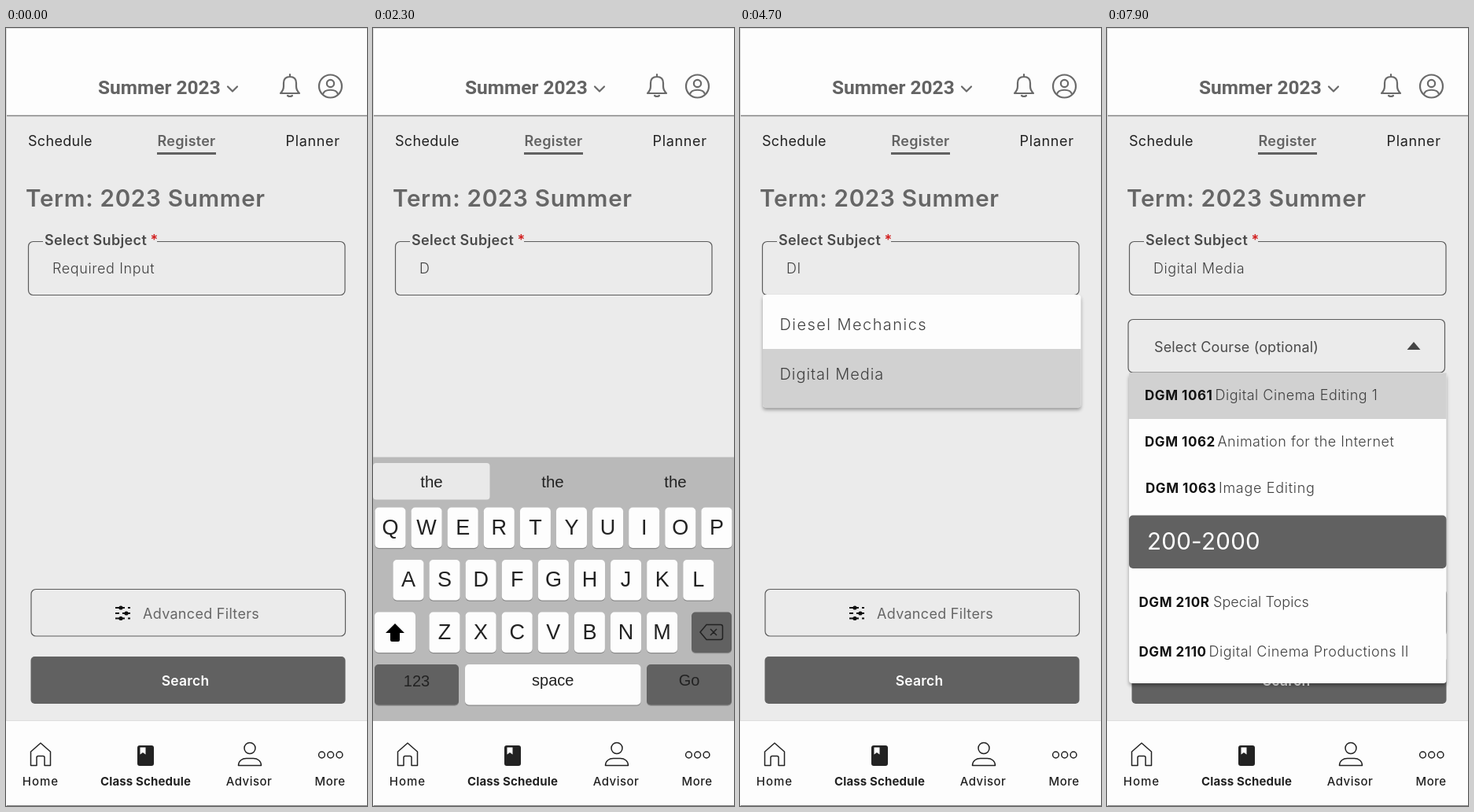
An HTML page for the animation above (8 s loop, 459 px wide and 989 px high).

```html
<!DOCTYPE html>
<html lang="en">
<head>
<meta charset="utf-8">
<title>Class registration</title>
<style>
  html, body { margin: 0; width: 100%; height: 100%; overflow: hidden; background: #fdfdfd; }
  svg { display: block; width: 459px; height: 989px; font: 18px Inter, sans-serif; }
  .line { fill: none; stroke: #5c5c5c; stroke-width: 1.2; }
  .icon { fill: none; stroke: #6a6a6a; stroke-width: 2.2; stroke-linecap: round; stroke-linejoin: round; }
  .thin { stroke: #222; stroke-width: 1.5; }
  .mid { text-anchor: middle; }
  .bold { font-weight: 600; }
  .soft { fill: #404040; font-weight: 300; }
  .nav { font-size: 15px; font-weight: 500; letter-spacing: .45px; text-anchor: middle; fill: #222; }
  .panel { filter: drop-shadow(0 3px 2px rgba(0, 0, 0, .35)); }
  .code { font-size: 17px; font-weight: 700; letter-spacing: .55px; fill: #111; }
  #keyboard { font-family: "Liberation Sans", Arial, sans-serif; font-size: 20px; text-anchor: middle; fill: #222; }
  #keyboard .letter { font-size: 27px; }
</style>
</head>
<body>
<svg viewBox="0 0 459 989">
  <rect width="459" height="989" fill="#fdfdfd"/>
  <rect y="111" width="459" height="770" fill="#ebebeb"/>
  <path d="M0 111.5H459M0 988.5H459" stroke="#858585" stroke-width="1.4"/>
  <path d="M0 .5H459M.5 0V989M0 880.5H459" stroke="#dedede"/>

  <text x="117" y="84" font-family="Roboto, sans-serif" font-size="24.5" font-weight="700" fill="#636363">Summer 2023</text>
  <g class="icon">
    <path d="M282 74.5l6 6 6-6"/>
    <path d="M349 83c3-3 4-5 4-9v-4c0-5 3-8 8-8s8 3 8 8v4c0 4 1 6 4 9zM361 59v3M358 86q3 2 6 0"/>
    <circle cx="412.5" cy="74" r="14.5"/>
    <circle cx="412.5" cy="70.500" r="4.600"/>
    <path d="M403 84c2-7 17-7 19 0"/>
  </g>

  <text x="28" y="149.500" letter-spacing=".3" fill="#222">Schedule</text>
  <text class="mid bold" x="229.500" y="149.500" letter-spacing=".25" fill="#636363">Register</text>
  <text x="355.500" y="149.500" letter-spacing=".65" fill="#222">Planner</text>
  <rect x="192" y="158" width="75" height="3" fill="#616161"/>

  <text class="bold" x="25" y="227" font-size="29.6" letter-spacing=".7" fill="#666">Term: 2023 Summer</text>

  <rect class="line" x="28.500" y="271.500" width="402.500" height="68" rx="6"/>
  <rect x="47" y="268" width="145" height="7" fill="#ebebeb"/>
  <text class="bold" x="49" y="276" letter-spacing=".35" fill="#4a4a4a">Select Subject</text>
  <text class="bold" x="183.500" y="276" fill="#d21f1f">*</text>
  <text class="soft" id="subject" x="59" y="312" letter-spacing=".6"></text>

  <g id="course">
    <rect class="line" x="27" y="370.500" width="402.500" height="67.500" rx="6"/>
    <text x="60" y="411.500" letter-spacing=".15" fill="#4a4a4a">Select Course (optional)</text>
    <path id="arrow" d="M381.500 399h17l-8.500 10z" fill="#444"/>
  </g>

  <rect class="line" x="32" y="713.500" width="399.500" height="59.500" rx="6"/>
  <path d="M139 737h12M155 737h3M139 744h5M148 744h10M139 750.500h12M155 750.500h3" stroke="#111" stroke-width="1.8"/>
  <g fill="#111"><circle cx="146" cy="737" r="2.6"/><circle cx="153" cy="744" r="2.6"/><circle cx="146" cy="750.500" r="2.6"/></g>
  <text x="174" y="750.500" letter-spacing=".3" fill="#666">Advanced Filters</text>
  <rect x="31.500" y="799" width="400" height="60" rx="5" fill="#616161"/>
  <text class="mid bold" x="228" y="836" font-size="17.5" letter-spacing=".2" fill="#fff">Search</text>

  <g id="subjects">
    <rect class="panel" x="29" y="339" width="404.500" height="143.500" rx="4" fill="#fdfdfd"/>
    <path id="subjectHover" d="M29 408h404.500v70.500q0 4-4 4H33q-4 0-4-4z" fill="#d1d1d1"/>
    <g class="soft" font-size="20">
      <text x="50.500" y="384" letter-spacing="1.45">Diesel Mechanics</text>
      <text x="50.500" y="447" letter-spacing=".95">Digital Media</text>
    </g>
  </g>

  <g id="courses">
    <rect class="panel" x="28" y="438.500" width="403.500" height="394.500" rx="4" fill="#fdfdfd"/>
    <rect id="courseHover" x="28" y="438.500" width="403.500" height="58.500" fill="#d1d1d1"/>
    <rect x="28" y="619.500" width="403.500" height="67.500" rx="5" fill="#616161"/>
    <text x="51" y="662.500" font-size="29.500" letter-spacing=".3" fill="#fff">200-2000</text>
  </g>

  <g id="keyboard"><rect y="545.500" width="459" height="335.500" fill="#b9b9b9"/></g>

  <rect y="881" width="459" height="107" fill="#fdfdfd"/>
  <g class="icon thin">
    <path d="M31.500 920l12.500-11 12.500 11v17.500H49V927.500q0-2-2-2h-6q-2 0-2 2v10h-7.500z"/>
    <circle cx="310" cy="915.500" r="7"/>
    <path d="M295.500 937.500c0-6 5-9 10-9h9c5 0 10 3 10 9z"/>
    <circle cx="401.500" cy="924" r="3.900"/><circle cx="412.700" cy="924" r="3.900"/><circle cx="424" cy="924" r="3.900"/>
  </g>
  <rect x="167" y="912" width="21" height="26" rx="3" fill="#222"/>
  <path d="M170.500 914.500h7v9l-3.500-2.500-3.500 2.500z" fill="#fff"/>
  <g class="nav">
    <text x="44" y="962.500" letter-spacing="1">Home</text>
    <text x="177.500" y="962.500" font-weight="700" style="letter-spacing: .15px">Class Schedule</text>
    <text x="309" y="962.500">Advisor</text>
    <text x="412" y="962.500">More</text>
  </g>
</svg>
<script>
const LOOP = 8000, FADE = 300;
const byId = id => document.getElementById(id);

function add(parent, tag, attrs, text = '') {
  const node = document.createElementNS('http://www.w3.org/2000/svg', tag);
  for (const name in attrs) node.setAttribute(name, attrs[name]);
  node.textContent = text;
  return parent.appendChild(node);
}

const keyboard = byId('keyboard');
function key(x, y, width, label, baseline, { dark, letter } = {}) {
  const box = { x, y, width, height: 51.5, rx: 5 };
  add(keyboard, 'rect', { ...box, y: y + 1.2, fill: '#8c8c8c' });
  add(keyboard, 'rect', { ...box, fill: dark ? '#616161' : '#fdfdfd' });
  add(keyboard, 'text', { x: x + width / 2, y: baseline, class: letter ? 'letter' : '' }, label);
}

add(keyboard, 'rect', { x: 0, y: 553, width: 148.5, height: 46.5, rx: 4, fill: '#e9e9e9' });
for (const x of [74.5, 228.5, 384.5]) add(keyboard, 'text', { x, y: 583.5, 'font-size': 20.5 }, 'the');
[['QWERTYUIOP', 2.5, 609.5], ['ASDFGHJKL', 25.5, 676], ['ZXCVBNM', 71.5, 742.5]].forEach(([row, x, y]) =>
  [...row].forEach((ch, i) => key(x + i * 46.1, y, 39, ch, y + 34, { letter: true })));
key(2, 742.5, 52, '', 0);
key(405, 742.5, 51, '', 0, { dark: true });
key(2, 809, 107, '123', 837, { dark: true });
key(117, 809, 223.5, 'space', 836);
key(348, 809, 108, 'Go', 836, { dark: true });
add(keyboard, 'path', { d: 'M28 757l12 12h-6v9q0 2-2 2h-8q-2 0-2-2v-9h-6z', fill: '#000' });
add(keyboard, 'path', {
  d: 'M416 768l8-9.500h18q2.500 0 2.500 2.500v14q0 2.500-2.500 2.500h-18zM429 764l8 8m0-8l-8 8',
  fill: 'none', stroke: '#222', 'stroke-width': 1.5
});

[
  [48, 473, 'DGM 1061', 137.5, 'Digital Cinema Editing 1', .5],
  [48, 532, 'DGM 1062', 140.5, 'Animation for the Internet', .5],
  [49, 591, 'DGM 1063', 142, 'Image Editing', .7],
  [40.5, 736, 'DGM 210R', 135, 'Special Topics', .05],
  [40.5, 799, 'DGM 2110', 129.5, 'Digital Cinema Productions II', .5]
].forEach(([x, y, code, titleX, title, spacing]) => {
  add(byId('courses'), 'text', { x, y, class: 'code' }, code);
  add(byId('courses'), 'text', { x: titleX, y, class: 'soft', 'letter-spacing': spacing }, title);
});

// Ease-out progress of a transition that begins at `start`
function ease(t, start, duration = FADE) {
  const p = Math.min(1, Math.max(0, (t - start) / duration));
  return 1 - (1 - p) ** 2;
}
const show = (id, opacity) => byId(id).setAttribute('opacity', opacity);

function draw() {
  const t = performance.now() % LOOP;
  const open = ease(t, 6670);
  byId('subject').textContent =
    t < 1900 ? 'Required Input' : t < 2700 ? 'D' : t < 5150 ? 'DI' : 'Digital Media';
  show('keyboard', ease(t, 700) - ease(t, 3900));
  show('subjects', ease(t, 2700) - ease(t, 5100));
  show('subjectHover', ease(t, 4500, 200));
  show('course', ease(t, 5100));
  show('courses', open);
  show('courseHover', ease(t, 7700, 200));
  byId('arrow').setAttribute('transform', `rotate(${180 * open} 390 404)`);
  requestAnimationFrame(draw);
}
draw();
</script>
</body>
</html>
```
